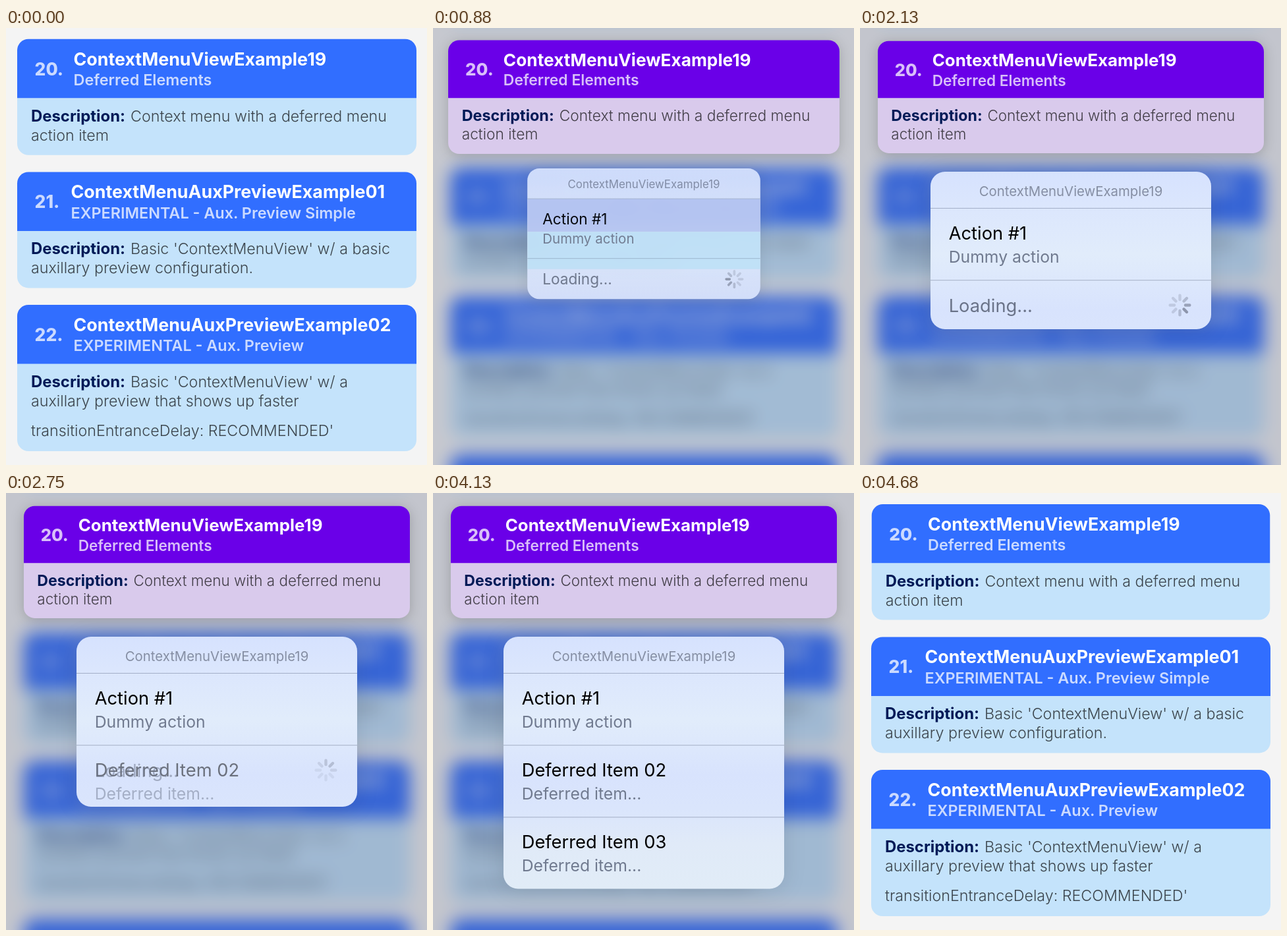
Animation, 639 px wide and 663 px high, one loop 4860 ms. Source, as an HTML page:

```html
<!DOCTYPE html>
<html lang="en">
<head>
<meta charset="utf-8">
<title>Context menu with deferred items</title>
<style>
  html, body { margin: 0; width: 100%; height: 100%; overflow: hidden; background: #f4f4f4; }
  svg { display: block; width: 100%; height: 100%; }
  text { font-family: Inter, "Noto Sans", sans-serif; font-optical-sizing: none; }
  .head { fill: color-mix(in srgb, #6a00e8 var(--purple, 0%), #316eff); }
  .body { fill: color-mix(in srgb, #d9caec var(--purple, 0%), #c4e3fb); }
  .number { font-size: 26.4px; font-weight: 800; fill: #fff; fill-opacity: .75; }
  .title { font-size: 26.8px; font-weight: 700; fill: #fff; }
  .subtitle { font-size: 23.4px; font-weight: 600; fill: #fff; fill-opacity: .75; }
  .desc { font-size: 23.25px; font-weight: 300; fill: #000; fill-opacity: .7; }
  .label { font-size: 23.9px; font-weight: 700; fill: #001a57; fill-opacity: 1; }
  .caption { font-size: 20.35px; fill: #858ea3; text-anchor: middle; }
  .action { font-size: 27.3px; fill: #000; }
  .detail { font-size: 24.75px; fill: #707a8f; }
  .rule { stroke: #56637d; stroke-opacity: .42; }
  #loading .action { fill: #6a7388; }
  #spinner line { stroke: #3c4254; stroke-width: 4.4; stroke-linecap: round; }
</style>
</head>
<body>
<svg viewBox="0 0 639 663">
  <defs>
    <clipPath id="menuClip"><rect class="menuBox" x="107" y="218" width="426" rx="22"/></clipPath>
    <linearGradient id="glass" gradientUnits="userSpaceOnUse" x1="0" y1="218" x2="0" y2="600">
      <stop offset="0" stop-color="#d6e2fe"/>
      <stop offset=".13" stop-color="#dbe6fd"/>
      <stop offset=".33" stop-color="#e1ecfb"/>
      <stop offset=".55" stop-color="#d8e3fd"/>
      <stop offset=".68" stop-color="#dae5fc"/>
      <stop offset=".82" stop-color="#e0eaf8"/>
      <stop offset="1" stop-color="#e1ecf7"/>
    </linearGradient>
  </defs>
  <g id="list"></g>
  <rect id="dim" width="639" height="663" fill="#404664"/>
  <g id="lifted"></g>
  <g id="menu">
    <rect class="menuBox" x="107" y="218" width="426" rx="22" fill="url(#glass)"
          style="filter: drop-shadow(0 2px 16px rgba(0,0,0,.1))"/>
    <g clip-path="url(#menuClip)">
      <g id="backdrop">
        <rect x="107" y="274" width="426" height="60" fill="#b8c7f3"/>
        <rect x="107" y="334" width="426" height="68" fill="#c0e4fa"/>
      </g>
      <text class="caption" x="320" y="254.5">ContextMenuViewExample19</text>
      <g id="rows"></g>
      <g id="loading">
        <text class="action" x="134.7" y="430.5">Loading...</text>
        <g id="spinner" transform="translate(485.5 420.5)"></g>
      </g>
    </g>
  </g>
</svg>
<script>
const LOOP = 4860, STEP = 125;
const $ = id => document.getElementById(id);

function card({ top, height, number = '', titleX = 103, title = '', subtitle = '', lines = [] }) {
  const text = (cls, x, y, content) => `<text class="${cls}" x="${x}" y="${y}">${content}</text>`;
  const describe = line => `<tspan class="label">Description:</tspan> <tspan dx="1.5">${line}</tspan>`;
  return `<g transform="translate(17 ${top})">
    <path class="body" d="M0 89H606V${height - 17}a17 17 0 0 1-17 17H17a17 17 0 0 1-17-17Z"/>
    <path class="head" d="M0 89.5V17a17 17 0 0 1 17-17H589a17 17 0 0 1 17 17V89.5Z"/>
    ${text('number', 26.6, 55, number)}
    ${text('title', titleX - 17.5, 40, title)}
    ${text('subtitle', titleX - 17.5, 70.3, subtitle)}
    ${lines.map(([y, line], i) => text('desc', 21, y, i ? line : describe(line))).join('')}
  </g>`;
}

$('list').innerHTML = '<rect x="-200" y="-200" width="1040" height="1100" fill="#f4f4f4"/>' + [
  { top: -184.8, height: 176 },
  { top: 218.4, height: 176, number: '21.', titleX: 99,
    title: 'ContextMenuAuxPreviewExample01', subtitle: 'EXPERIMENTAL - Aux. Preview Simple',
    lines: [[125, "Basic 'ContextMenuView' w/ a basic"], [154, 'auxillary preview configuration.']] },
  { top: 420, height: 222, number: '22.',
    title: 'ContextMenuAuxPreviewExample02', subtitle: 'EXPERIMENTAL - Aux. Preview',
    lines: [[125, "Basic 'ContextMenuView' w/ a"], [154, 'auxillary preview that shows up faster'],
            [199, "transitionEntranceDelay: RECOMMENDED'"]] },
  { top: 667.6, height: 176 }
].map(card).join('');

$('lifted').innerHTML = card({
  top: 16.8, height: 176, number: '20.',
  title: 'ContextMenuViewExample19', subtitle: 'Deferred Elements',
  lines: [[125, 'Context menu with a deferred menu'], [154, 'action item']]
});

$('rows').innerHTML = [
  ['Action #1', 'Dummy action'],
  ['Deferred Item 02', 'Deferred item...'],
  ['Deferred Item 03', 'Deferred item...']
].map(([action, detail], i) => `<g transform="translate(0 ${i * 109.2})">
  <line class="rule" x1="107" x2="533" y1="273.5" y2="273.5"/>
  <g class="row"><text class="action" x="134.7" y="321">${action}</text>
  <text class="detail" x="134.7" y="355.5">${detail}</text></g></g>`).join('');

$('spinner').innerHTML = Array.from({ length: 8 }, (_, i) =>
  `<line y1="-8.5" y2="-14.8" transform="rotate(${i * 45})"/>`).join('');

const spokes = [...$('spinner').children];
const deferredRows = [...document.querySelectorAll('.row')].slice(1);
const menuBoxes = document.querySelectorAll('.menuBox');
const spokeFade = [.48, .4, .25, .16, .16, .16, .16, .25];

// Linear interpolation through [time, value] keys, held at both ends.
function track(t, ...keys) {
  const next = keys.findIndex(([time]) => time > t);
  if (next === 0) return keys[0][1];
  if (next < 0) return keys.at(-1)[1];
  const [[t0, a], [t1, b]] = [keys[next - 1], keys[next]];
  return a + (b - a) * (t - t0) / (t1 - t0);
}

// The picture advances eight times a second, with two longer holds at the end.
function sampleTime(t) {
  if (t >= 4680) return 4680;
  return Math.min(4500, Math.floor(Math.floor(t / 10) * 10 / STEP) * STEP);
}

// Critically damped spring going from 0 to 1.
function spring(seconds, stiffness) {
  const x = Math.max(0, seconds) * stiffness;
  return 1 - (1 + x) * Math.exp(-x);
}

function scaleAbout(x, y, scale, dy = 0) {
  return `translate(${x} ${y + dy}) scale(${scale}) translate(${-x} ${-y})`;
}

function draw(t) {
  const cardScale = track(t, [125, 1], [250, .9975], [500, .987], [750, .979], [875, .98],
    [1125, .969], [1375, .967], [4375, .967], [4500, .972], [4680, .9975]);
  const lift = track(t, [625, 0], [750, .15], [875, .95], [1000, 1], [4375, 1], [4500, .55], [4680, 0]);
  const purple = track(t, [625, 0], [750, .3], [875, 1], [4375, 1], [4500, .5], [4680, 0]);

  $('list').setAttribute('transform', scaleAbout(320, 0, 1 - .032 * lift));
  $('list').style.filter = lift ? `blur(${14 * lift}px)` : 'none';
  $('dim').style.opacity = .27 * lift;
  $('lifted').setAttribute('transform', scaleAbout(320, 105, cardScale));
  $('lifted').style.setProperty('--purple', purple * 100 + '%');
  $('lifted').style.filter = lift ? `drop-shadow(0 3px 10px rgba(0,0,0,${.2 * lift}))` : 'none';

  const menuScale = track(t, [750, .5], [875, .83], [1000, .97], [1125, 1.003], [1250, 1], [4375, 1], [4500, .97]);
  const menuShift = track(t, [875, -5], [1000, -1], [1125, 0], [4375, 0], [4500, -4]);
  $('menu').setAttribute('transform', scaleAbout(320, 218, menuScale, menuShift));
  $('menu').style.opacity = track(t, [750, 0], [875, .93], [1000, 1], [4375, 1], [4500, .7], [4680, 0]);
  $('backdrop').style.opacity = track(t, [875, .9], [1000, .2], [1125, 0]);

  const menuHeight = 239 + 143.4 * spring((t - 2700) / 1000, 12.6);
  menuBoxes.forEach(box => box.setAttribute('height', menuHeight));
  const loaded = track(t, [2625, 0], [2750, .5], [2875, 1]);
  $('loading').style.opacity = 1 - loaded;
  deferredRows.forEach(row => row.style.opacity = loaded);

  const head = Math.floor(t / 100 + .05) + 6;
  spokes.forEach((spoke, i) => spoke.style.opacity = spokeFade[(head - i + 8) % 8]);
}

const start = performance.now();
function tick() {
  draw(sampleTime((performance.now() - start) % LOOP));
  requestAnimationFrame(tick);
}
tick();
</script>
</body>
</html>
```
